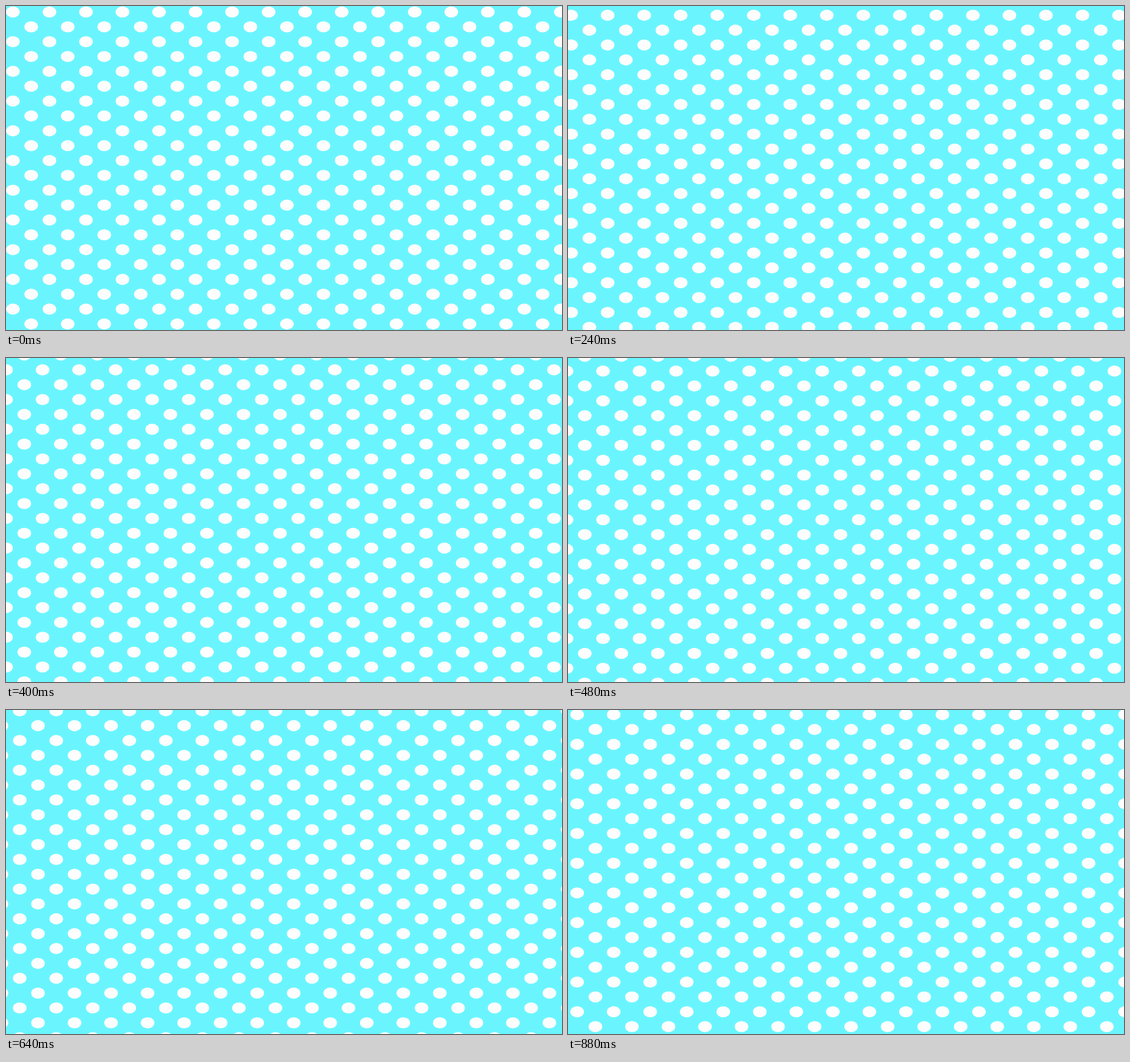
These frames come from a looping animation (980 by 572 pixels, 0.96 s). An HTML page:

```html
<!DOCTYPE html>
<html lang="en">
<head>
<meta charset="utf-8">
<title>Drifting dots</title>
<style>
  html, body { margin: 0; width: 100%; height: 100%; overflow: hidden; background: #6af5fe; }
  svg { display: block; width: 980px; height: 572px; }
</style>
</head>
<body>
<svg viewBox="0 0 980 572"><g id="dots" fill="#fdfdfd"></g></svg>
<script>
const LOOP = 960, STEP = 80;
const GAP_X = 64.386, GAP_Y = 26.23;
const LEFT = 12.2, TOP = 10.5;
const dots = document.getElementById('dots');

function addDot(x, y) {
  const dot = document.createElementNS('http://www.w3.org/2000/svg', 'ellipse');
  const attrs = { cx: x.toFixed(2), cy: y.toFixed(2), rx: 12, ry: 9.8 };
  for (const name in attrs) dot.setAttribute(name, attrs[name]);
  dots.appendChild(dot);
}

// Every second row is shifted by half a gap.
for (let row = -2; row <= 22; row++) {
  const shift = row % 2 ? GAP_X / 2 : 0;
  for (let col = -1; col <= 16; col++) {
    addDot(LEFT + shift + col * GAP_X, TOP + row * GAP_Y);
  }
}

// The drift is even, apart from a shorter first step.
function draw(time) {
  const n = Math.floor((time % LOOP) / STEP);
  const x = n ? 1.32 - 2.69 * n : 0;
  const y = n ? 2.25 * n - 0.85 : 0;
  dots.setAttribute('transform', `translate(${x.toFixed(2)} ${y.toFixed(2)})`);
}

let start = null;
function tick(now) {
  if (start === null) start = now;
  draw(now - start);
  requestAnimationFrame(tick);
}
draw(0);
requestAnimationFrame(tick);
</script>
</body>
</html>
```
